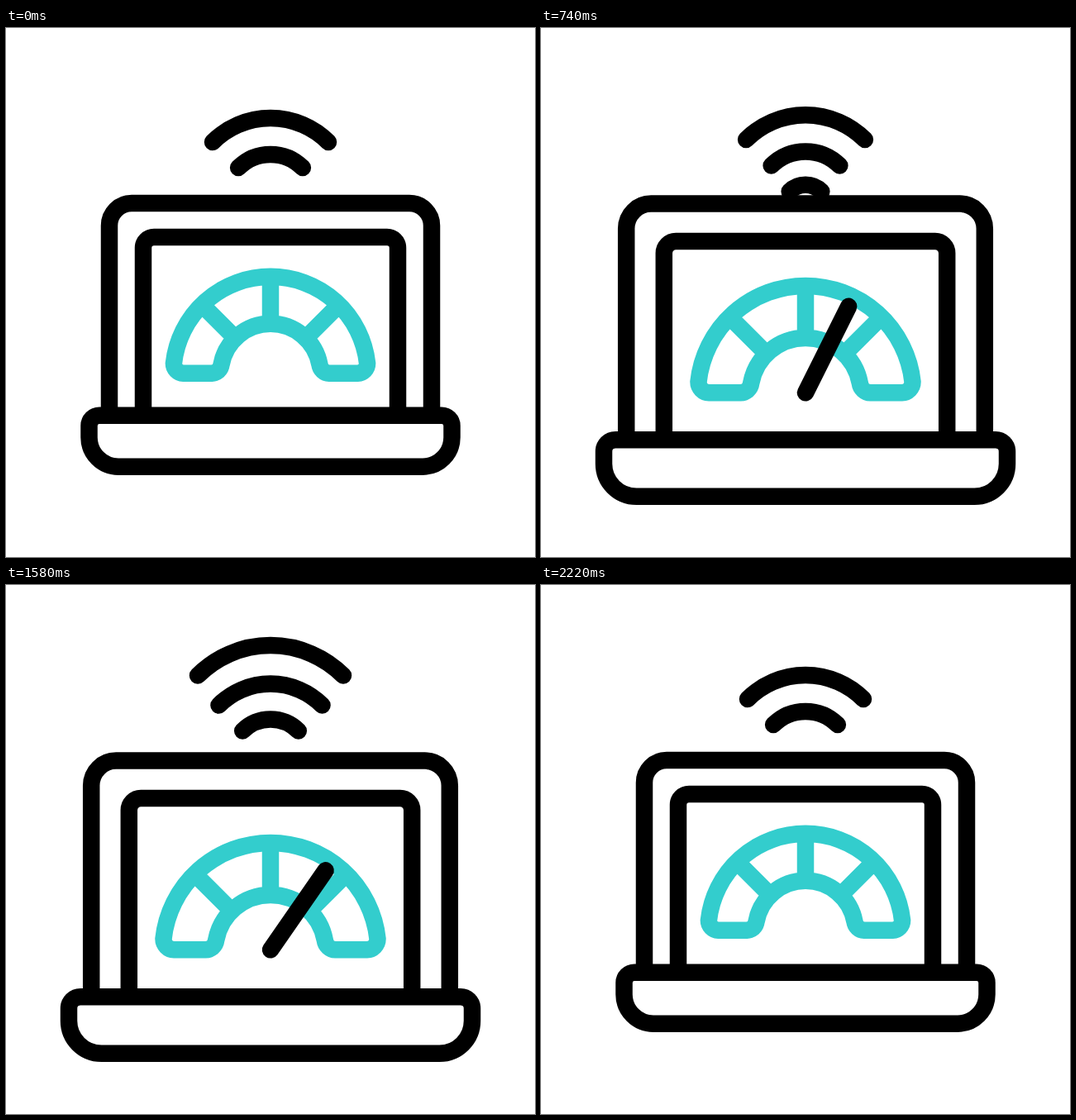
These frames come from a looping animation (640 by 640 pixels, 2400 ms). An HTML page:

```html
<!DOCTYPE html>
<html lang="en">
<head>
<meta charset="utf-8">
<title>Laptop speed gauge</title>
<style>
  html, body { margin: 0; width: 100%; height: 100%; overflow: hidden; background: #fff; }
  svg { display: block; width: 100vw; height: 100vh; }
  path { fill: none; stroke: #000; stroke-width: 20.5; }
  .round { stroke-linecap: round; }
  .teal { stroke: #33cdcd; }
</style>
</head>
<body>
<svg viewBox="0 0 640 640">
  <path id="lid"/>
  <path id="screen"/>
  <path id="gauge" class="teal"/>
  <path id="needle" class="round"/>
  <path id="base"/>
  <path id="wave0" class="round"/>
  <path id="wave1" class="round"/>
  <path id="wave2" class="round"/>
</svg>
<script>
const LOOP = 2400, STEP = 20, BEGIN = 200, END = 2200, WAVE = 500, CX = 320;

// Start and end of each wave: radius, then height of its centre
const waves = [
  { r: [99, 132.5], y: [208, 194.2] },
  { r: [55, 99], y: [208, 208] },
  { r: [25, 55], y: [218, 208] }
];

const el = id => document.getElementById(id);
const draw = (id, d) => el(id).setAttribute('d', d);
const show = (id, on) => el(id).setAttribute('visibility', on ? 'visible' : 'hidden');
const mix = (a, b, k) => a + (b - a) * k;
const ease = (t, from, to) => {
  const x = Math.min(1, Math.max(0, (t - from) / (to - from)));
  return x * x * (3 - 2 * x);
};

// Open frame with rounded top corners, symmetric around CX
function arch(half, top, r, bottom) {
  const l = CX - half, rt = CX + half;
  return `M${l} ${bottom}V${top + r}A${r} ${r} 0 0 1 ${l + r} ${top}` +
    `H${rt - r}A${r} ${r} 0 0 1 ${rt} ${top + r}V${bottom}`;
}

function tray(half, top, bottom, r, R) {
  const l = CX - half, rt = CX + half;
  return arch(half, top, r, bottom - R) +
    `A${R} ${R} 0 0 1 ${rt - R} ${bottom}H${l + R}A${R} ${R} 0 0 1 ${l} ${bottom - R}Z`;
}

function gaugePath(y, s) {
  const at = (dx, dy) => `${CX + dx * s} ${y + dy * s}`;
  const arc = (r, sweep, dx, dy) => `A${r * s} ${r * s} 0 0 ${sweep} ${at(dx, dy)}`;
  const spoke = deg => {
    const a = deg * Math.PI / 180, dx = Math.sin(a), dy = -Math.cos(a);
    return `M${at(60.5 * dx, 60.5 * dy)}L${at(117.8 * dx, 117.8 * dy)}`;
  };
  return `M${at(-117.1, -12)}` + arc(117.8, 1, 117.1, -12) +
    arc(12, 1, 105.5, 0) + `L${at(71, 0)}` + arc(12, 1, 59.5, -10.5) +
    arc(60.5, 0, -59.5, -10.5) + arc(12, 1, -71, 0) +
    `L${at(-105.5, 0)}` + arc(12, 1, -117.1, -12) + 'Z' +
    [-45, 0, 45].map(spoke).join('');
}

function wavePath(r, y) {
  const h = r * Math.SQRT1_2;
  return `M${CX - h} ${y - h}A${r} ${r} 0 0 1 ${CX + h} ${y - h}`;
}

function needleAngle(t) {
  const u = Math.abs(t - 1200);
  return mix(1, 35, ease(u, 0, 400)) - 139 * ease(u, 400, 800);
}

function render(time) {
  const t = Math.floor((time % LOOP) / STEP) * STEP;
  const grow = ease(t, 200, 600) - ease(t, 1800, 2200);
  const baseTop = mix(468.7, 498.2, grow);
  const pivot = mix(417.8, 441.3, grow);
  const scale = mix(1, 1.106, grow);

  draw('lid', arch(mix(195, 216.8, grow), mix(212, 212.6, grow), mix(27, 30, grow), baseTop));
  draw('screen', arch(mix(154, 171.2, grow), mix(253, 258, grow), mix(13, 14.4, grow), baseTop));
  draw('base', tray(mix(219.5, 244, grow), baseTop, mix(530.7, 566.8, grow),
    mix(12.5, 14, grow), mix(35.5, 39.5, grow)));
  draw('gauge', gaugePath(pivot, scale));

  const a = needleAngle(t) * Math.PI / 180, len = 105.6 * scale;
  draw('needle', `M${CX} ${pivot}L${CX + len * Math.sin(a)} ${pivot - len * Math.cos(a)}`);
  show('needle', t >= 400 && t <= 2000);

  // Each wave travels to the place of the next one, then all restart
  const running = t >= BEGIN && t <= END;
  const phase = (t - BEGIN) / WAVE;
  const q = running && phase > 0 ? phase - Math.ceil(phase) + 1 : 0;
  waves.forEach((w, i) => draw('wave' + i, wavePath(mix(...w.r, q), mix(...w.y, q))));
  show('wave2', running);
}

const start = performance.now();
function tick() {
  render(performance.now() - start);
  requestAnimationFrame(tick);
}
tick();
</script>
</body>
</html>
```
